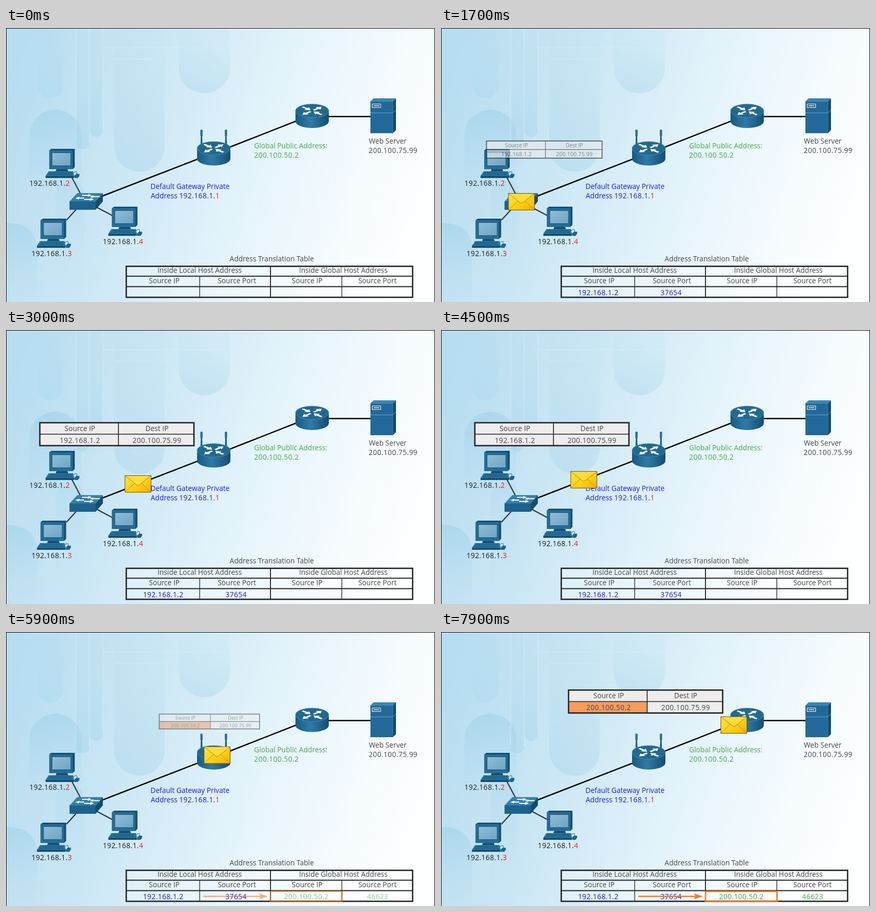
An HTML page that plays this animation: 824 by 526 pixels, repeating every 8000 ms.

```html
<!DOCTYPE html>
<html lang="en">
<head>
<meta charset="utf-8">
<title>Address translation</title>
<style>
@property --t { syntax: "<number>"; inherits: true; initial-value: 0; }
@keyframes clock { from { --t: 0; } to { --t: 8000; } }

html, body { margin: 0; width: 100%; height: 100%; overflow: hidden; background: #e4f3fb; }
svg { display: block; width: 100%; height: 100%; animation: clock 8s steps(80) infinite; }

text { font: 13.6px "Open Sans", "Noto Sans", sans-serif; fill: #474747; }
.n { letter-spacing: .42px; }
.mid { text-anchor: middle; }
.host { fill: #1c1c1c; }
.red { fill: #f01818; }
.blue { fill: #1c1ce0; }
.green { fill: #46ac4a; }
.wire { stroke: #000; stroke-width: 2.5; fill: none; }
.cable { stroke: #333; stroke-width: 2.2; fill: none; }
.grid { stroke: #222; fill: none; }

/* the message travels in five legs, each running from 0 to 1 */
.mail {
  --a: clamp(0, (var(--t) - 500) / 800, 1);
  --b: clamp(0, (var(--t) - 2050) / 1050, 1);
  --c: clamp(0, (var(--t) - 4420) / 960, 1);
  --d: clamp(0, (var(--t) - 5780) / 520, 1);
  --e: clamp(0, (var(--t) - 7300) / 600, 1);
  transform: translate(
    calc(1px * (88 + 41 * var(--a) + 109.5 * var(--b) + 122.5 * var(--c) + 82 * var(--d) + 94 * var(--e))),
    calc(1px * (240 + 77 * var(--a) - 42 * var(--b) - 48 * var(--c) - 31 * var(--d) - 34 * var(--e))));
  opacity: clamp(0, (var(--t) - 400) / 300, 1);
}
/* headers zoom out of the message with a quadratic ease-out */
.head { transform: scale(calc(1 - var(--p) * var(--p))); }
.local {
  --p: clamp(0, (2075 - var(--t)) / 750, 1);
  transform-origin: 154.5px 333.5px;
  opacity: clamp(0, min((var(--t) - 1325) / 625, (5480 - var(--t)) / 750), 1);
}
.global {
  --p: clamp(0, (6343 - var(--t)) / 750, 1);
  transform-origin: 386.5px 243.5px;
  opacity: clamp(0, (var(--t) - 5593) / 625, 1);
}
.entry { opacity: clamp(0, (var(--t) - 500) / 750, 1); }
.mapped { opacity: clamp(0, (var(--t) - 5450) / 750, 1); }
</style>
</head>
<body>
<svg viewBox="0 0 824 526" preserveAspectRatio="none">
<defs>
  <linearGradient id="sky" gradientUnits="userSpaceOnUse" x1="0" y1="120" x2="800" y2="390">
    <stop offset="0" stop-color="#b7ddf0"/>
    <stop offset=".3" stop-color="#cbe7f5"/>
    <stop offset=".6" stop-color="#e5f4fb"/>
    <stop offset=".85" stop-color="#f7fcff"/>
    <stop offset="1" stop-color="#fdffff"/>
  </linearGradient>
  <linearGradient id="rise" x1="0" y1="0" x2="0" y2="1">
    <stop offset="0" stop-color="#8cc6e3" stop-opacity=".36"/>
    <stop offset="1" stop-color="#a9d6ec" stop-opacity="0"/>
  </linearGradient>
  <linearGradient id="drop" x1="0" y1="1" x2="0" y2="0">
    <stop offset="0" stop-color="#94cbe6" stop-opacity=".3"/>
    <stop offset="1" stop-color="#b4dcef" stop-opacity=".06"/>
  </linearGradient>
  <linearGradient id="side">
    <stop offset="0" stop-color="#175a83"/>
    <stop offset=".45" stop-color="#2f7ba6"/>
    <stop offset="1" stop-color="#124e74"/>
  </linearGradient>
  <linearGradient id="glass" x1="0" y1="0" x2="1" y2="1">
    <stop offset="0" stop-color="#8fbdd6"/>
    <stop offset="1" stop-color="#6ea5c4"/>
  </linearGradient>
  <linearGradient id="gold" x1="0" y1="0" x2="1" y2="1">
    <stop offset="0" stop-color="#ffe04a"/>
    <stop offset=".5" stop-color="#ffd21c"/>
    <stop offset="1" stop-color="#f0b000"/>
  </linearGradient>

  <path id="arrow" d="M4-2.5H15V-7L25 0L15 7V2.5H4z"/>

  <g id="router">
    <path d="M-32 0V20A32 13 0 0 0 32 20V0z" fill="url(#side)"/>
    <ellipse rx="32" ry="13" fill="#22698f" stroke="#4d90b5" stroke-width=".8"/>
    <g fill="#fff" transform="scale(1 .46)">
      <use href="#arrow" transform="rotate(-42)"/>
      <use href="#arrow" transform="rotate(138)"/>
      <use href="#arrow" transform="rotate(42) translate(29) scale(-1 1)"/>
      <use href="#arrow" transform="rotate(222) translate(29) scale(-1 1)"/>
    </g>
  </g>

  <g id="antenna">
    <path d="M-1.2 7H1.2L2 33H-2z" fill="#1b5f88"/>
    <rect x="-2.2" width="4.4" height="13" rx="1.6" fill="#286f98"/>
  </g>

  <g id="pc">
    <path d="M7 3L11 0H56V35L52 39H7z" fill="#164f74"/>
    <rect x="7" y="3" width="45" height="36" rx="1" fill="#256d97"/>
    <rect x="12.5" y="7.5" width="36" height="25" fill="url(#glass)" stroke="#17537a"/>
    <path d="M21 39H42L44 44H19z" fill="#174f73"/>
    <path d="M6 43H53L55 52H0z" fill="#2a739d"/>
    <path d="M0 52H55V56H0z" fill="#174f73"/>
    <path d="M8 46H50M5 49H51" stroke="#164f74"/>
    <path d="M53 46Q62 40 60 49" fill="none" stroke="#235f84"/>
    <path d="M55 52L59 48H65V52L62 56H56z" fill="#1e648f"/>
  </g>

  <g id="header">
    <path class="grid" d="M64.5 200H361M216 177.500V222" stroke-width="1.6"/>
    <rect class="grid" x="65" y="178" width="296" height="44" stroke-width="2.6"/>
    <text class="mid" x="142" y="193.500">Source IP</text>
    <text class="mid" x="290" y="193.500">Dest IP</text>
    <text class="mid n" x="290" y="216.500">200.100.75.99</text>
  </g>
</defs>

<!-- backdrop -->
<rect width="824" height="526" fill="url(#sky)"/>
<g fill="url(#rise)">
  <path d="M45 330V206A50 49 0 0 1 145 206V330z"/>
  <path d="M0 526V374Q60 374 60 430V526z"/>
  <path d="M95 526V320A28 28 0 0 1 151 320V526z" opacity=".45"/>
</g>
<g fill="url(#drop)">
  <path d="M134 0H160V220A13 13 0 0 1 134 220z"/>
  <path d="M160 0H186V196A13 13 0 0 1 160 196z"/>
  <path d="M208 0H305V228A48.500 48 0 0 1 208 228z"/>
  <path d="M332 0H430V78A49 47 0 0 1 332 78z"/>
  <path d="M60 0H110V110A25 25 0 0 1 60 110z" opacity=".6"/>
</g>
<path d="M134 0V220M160 0V220M186 0V196" stroke="#e4f4fb" stroke-opacity=".55" fill="none"/>
<path d="M186 38H430M208 60H305" stroke="#e4f4fb" stroke-opacity=".35" fill="none"/>

<!-- network -->
<path class="cable" d="M125 284L144 320M116 369L137 346M172 343L206 361"/>
<path class="wire" d="M184 323L370 251M429 229L559 178M618 170H702"/>

<use href="#pc" x="76" y="232"/>
<use href="#pc" x="59.500" y="366"/>
<use href="#pc" x="196.500" y="343"/>

<g>
  <path d="M122 333L137 317H186L172 333z" fill="#3580a9"/>
  <path d="M122 333H172V349H122z" fill="#1d628c"/>
  <path d="M172 333L186 317V333L172 349z" fill="#134d72"/>
  <g fill="#fff">
    <path d="M146 320.300H158V318.500L165 321.300L157 324V322.300H146z"/>
    <path d="M164 324.200H152V322.800L145 325.200L151 327.800V326.200H164z" transform="translate(16 -1.500)"/>
    <path d="M135 327H147V325.300L154 328L146 330.800V329H135z" transform="translate(15 1)"/>
    <path d="M150 325.500H141V324L133 326.500L140 329.200V327.500H150z"/>
  </g>
</g>

<use href="#antenna" x="375.500" y="195"/>
<use href="#antenna" x="422.500" y="195"/>
<use href="#router" x="399" y="231"/>
<use href="#router" x="588" y="159"/>

<g>
  <path d="M700 141L706 135H749L743 141z" fill="#3b86ae"/>
  <path d="M743 141L749 135V196L743 202z" fill="#124b70"/>
  <path d="M700 141H743V202H700z" fill="#22699a"/>
  <path d="M700 163H743L749 157" fill="none" stroke="#6ba5c5"/>
  <path d="M700 141H743V202" fill="none" stroke="#4b90b6" stroke-width=".7"/>
  <rect x="703.500" y="146" width="16" height="6.500" fill="#17547c" stroke="#e8f4fa" stroke-width="1.200"/>
  <path d="M706 149.300H717" stroke="#fff" stroke-width="1.500"/>
</g>

<!-- labels -->
<text class="n host" x="45" y="303">192.168.1.<tspan class="red">2</tspan></text>
<text class="n host" x="49" y="438">192.168.1.<tspan class="red">3</tspan></text>
<text class="n host" x="186" y="415">192.168.1.<tspan class="red">4</tspan></text>
<text class="blue" x="277.500" y="308.500">Default Gateway Private</text>
<text class="blue" x="278" y="326.500">Address <tspan class="n">192.168.1.<tspan class="red">1</tspan></tspan></text>
<text class="green" x="476.500" y="230.500">Global Public Address:</text>
<text class="green n" x="476.500" y="248.500">200.100.50.2</text>
<text x="697" y="221.500">Web Server</text>
<text class="n" x="696.500" y="239.500">200.100.75.99</text>

<!-- translation table -->
<text class="mid" x="510.500" y="448">Address Translation Table</text>
<rect x="231" y="457.500" width="550" height="59.500" fill="#fff" fill-opacity=".25"/>
<path class="grid" d="M231 476.500H781M231 496.500H781M508 457V517" stroke-width="1.800"/>
<path class="grid" d="M372 476V517M645 476V517" stroke-width="1.300"/>
<rect class="grid" x="231" y="457.500" width="550" height="59.500" stroke-width="2.600"/>
<text class="mid" x="372" y="470">Inside Local Host Address</text>
<text class="mid" x="648" y="470">Inside Global Host Address</text>
<text class="mid" x="304" y="490">Source IP</text>
<text class="mid" x="443.500" y="490">Source Port</text>
<text class="mid" x="578.500" y="490">Source IP</text>
<text class="mid" x="713.500" y="490">Source Port</text>
<g class="entry">
  <text class="mid n blue" x="302" y="513">192.168.1.2</text>
  <text class="mid n blue" x="442" y="513">37654</text>
</g>
<g class="mapped">
  <text class="mid n green" x="577" y="513">200.100.50.2</text>
  <text class="mid n green" x="714" y="513">46623</text>
  <rect x="508" y="498" width="137.500" height="18.500" fill="none" stroke="#f57c1f" stroke-width="2.600"/>
  <path d="M379 507.500H490" stroke="#f57c1f" stroke-width="2.400"/>
  <path d="M486 502L503 507.500L486 513L489 507.500z" fill="#f57c1f"/>
</g>

<!-- packet headers and message -->
<g class="head local">
  <rect x="65" y="178" width="296" height="44" fill="#ededed"/>
  <use href="#header"/>
  <text class="mid n" x="142" y="216.500">192.168.1.2</text>
</g>
<g class="head global">
  <g transform="translate(180 -66.500)">
    <rect x="65" y="178" width="296" height="44" fill="#ededed"/>
    <rect x="65" y="200" width="151" height="22" fill="#f79c5e"/>
    <use href="#header"/>
    <text class="mid n" x="142" y="216.500">200.100.50.2</text>
  </g>
</g>
<g class="mail">
  <rect x=".5" y=".5" width="50" height="32" fill="url(#gold)" stroke="#6d5310"/>
  <path d="M1 32L19 15M50 32L32 15" fill="none" stroke="#b98a08" stroke-width=".9"/>
  <path d="M1 1L23 18.500Q25.500 20.500 28 18.500L50 1" fill="#ffdc3c" stroke="#a87c08" stroke-width=".9"/>
</g>

<path d="M.5 526V.5H823.500V526" fill="none" stroke="#000"/>
</svg>
</body>
</html>
```
